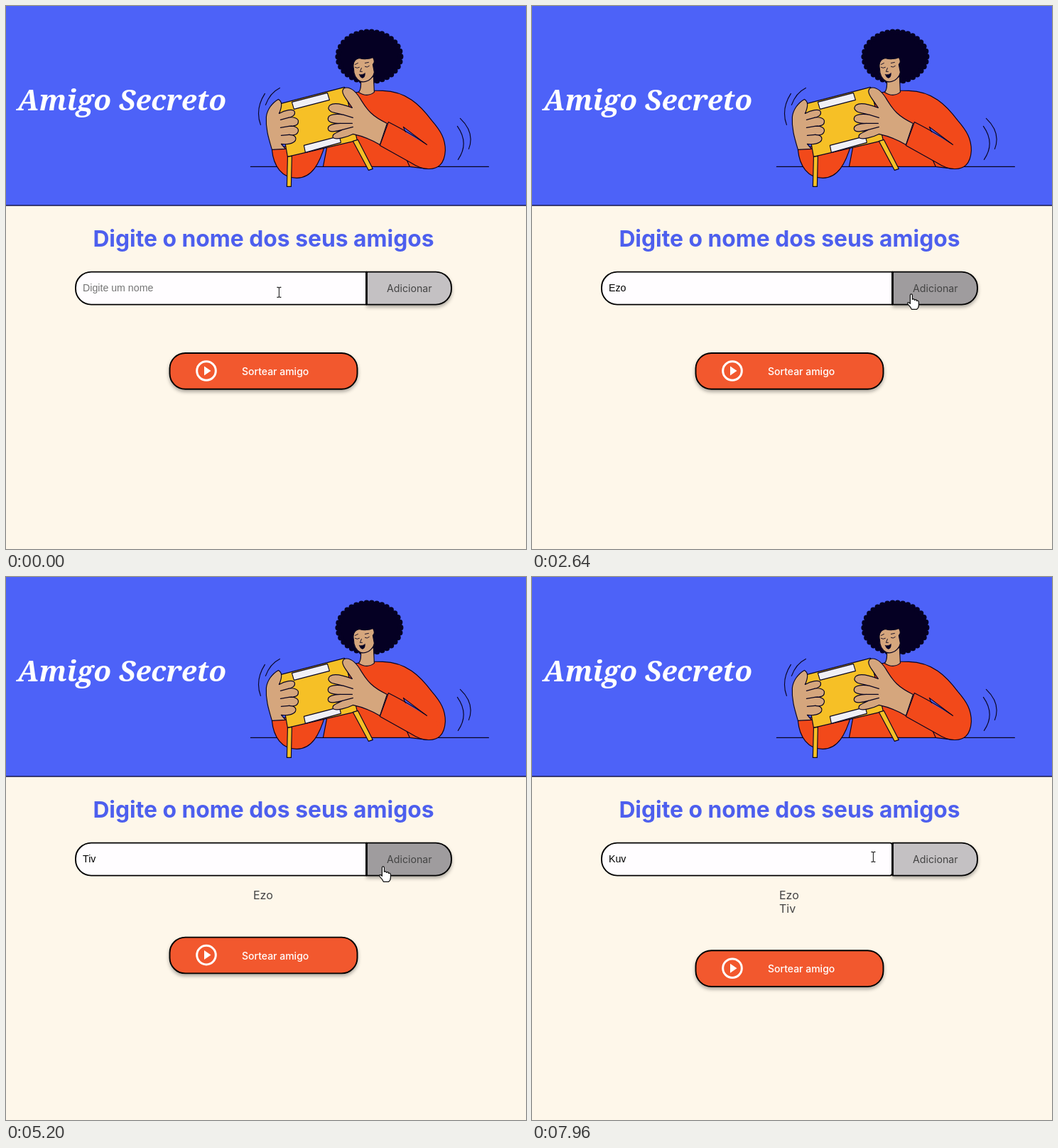
Recreate the animation shown at these times as an HTML page. Size 732 by 765 pixels, loop 8 s.

```html
<!DOCTYPE html>
<html lang="pt">
<head>
<meta charset="utf-8">
<title>Amigo Secreto</title>
<style>
  html, body { margin: 0; width: 100%; height: 100%; overflow: hidden; background: #fef7ea; }
  svg { display: block; width: 732px; height: 765px; }
  text { font: 14.2px Inter, sans-serif; }
  .title { font: italic 700 40.4px "Noto Serif", serif; fill: #fff; }
  .heading { font-size: 31.8px; font-weight: 700; fill: #4d5fee; text-anchor: middle; }
  .field { font-family: "Liberation Sans", Arial, sans-serif; }
  .friend { font-size: 16px; fill: #444; }
  .action { font-size: 14px; font-weight: 500; fill: #fff; }
  .box { stroke: #000; stroke-width: 1.9; }
  .shadow { filter: drop-shadow(.5px 3.5px 2.5px rgba(0, 0, 0, .32)); }
  .art { stroke: #080420; stroke-width: 1.15; stroke-linejoin: round; stroke-linecap: round; fill: none; }
  .art .shirt { fill: #f2491a; }
  .art .skin { fill: #d5a67d; }
  .art .gift { fill: #f6c026; }
  .art .label { fill: #f0f0f6; }
  .art .dark { fill: #050023; stroke: #050023; }
</style>
</head>
<body>
<svg viewBox="0 0 732 765">
  <rect width="732" height="765" fill="#fef7ea"/>
  <rect width="732" height="281" fill="#4d62f8"/>
  <path d="M0 281H732" stroke="#15164a" stroke-width="1.5"/>
  <text class="title" x="16" y="146.5">Amigo Secreto</text>

  <g class="art" transform="translate(.4 .4)">
    <path d="M344 226H679M364 123Q350 145 358 167M385 115Q371 122 365 139M639 158Q660 178 651 201M635 169Q652 193 636 216"/>

    <!-- Shirt -->
    <path class="shirt" d="M374 202C376 225 388 242 409 242C430 242 441 222 449 194L400 196Z"/>
    <path class="shirt" d="M446 226L452 195L490 122Q506 118 530 119C563 120 582 138 599 161C612 176 618 187 618 203C617 222 608 230 593 229L568 226Z"/>
    <path d="M559 170L592 195L563 180Z" fill="#4d62f8"/>
    <path d="M563 215L568 226"/>

    <!-- Head -->
    <ellipse class="dark" cx="511" cy="71" rx="44" ry="35"/>
    <ellipse class="dark" cx="511" cy="71" rx="44" ry="35" stroke-width="8" stroke-dasharray="0 7.3"/>
    <path class="skin" d="M499 104L517 99L518 121Q508 129 496 121Q500 117 499 104Z"/>
    <path class="skin" d="M489 88C487 78 492 74 497 73Q506 76 516 72Q520 78 516 82L518 93C516 103 506 108 499 106C491 102 489 96 489 88Z"/>
    <path stroke-width=".9" d="M491 86Q494 88 497 86M505 85Q508 87 511 84M491 82L495 80M505 80L510 79M500 87L498 92L501 92"/>
    <path class="dark" stroke-width=".6" d="M497 96Q502 97 505 94Q505 101 501 101Q498 100 497 96Z"/>

    <!-- Gift -->
    <path class="gift" d="M383 138L476 114L494 189L396 212Z"/>
    <path class="label" d="M402 135L452 122L455 132L405 145Z"/>
    <path class="label" d="M419 196L469 183L471 192L421 206Z"/>
    <path class="gift" d="M396 212L402 211L401 254H395Z"/>
    <path class="gift" d="M488 190L495 188L516 229L510 231Z"/>

    <!-- Hands and forearm -->
    <path class="skin" d="M374 202C369 185 365 172 366 156C367 146 374 136 383 131C389 134 388 142 384 151C391 147 405 143 406 149C407 154 402 156 397 157C404 155 412 158 411 163C411 168 404 169 398 169C406 168 412 171 411 176C410 181 404 182 398 181C405 181 409 184 407 189C404 194 394 195 387 194L393 201Z"/>
    <path d="M397 157L386 160M398 169L386 171M398 181L387 182"/>
    <path class="skin" d="M536 165C515 155 508 146 500 133C492 119 484 113 476 115C471 118 474 124 478 130L487 143C474 138 462 135 456 139C450 144 456 149 462 150L475 153C465 151 453 152 453 158C452 164 462 165 470 165C462 165 452 167 453 173C454 178 462 177 473 174C462 179 458 181 460 185C464 189 480 184 488 180Q507 184 526 195Z"/>
    <path d="M475 153L488 157M470 165L487 165M473 174L488 170"/>
    <path class="shirt" stroke="none" d="M538 163L592 195L610 205L593 229Q583 228 569 220L526 196Z"/>
    <path d="M592 195Q575 182 538 163L526 196L569 220Q583 229 593 229"/>
  </g>

  <text class="heading" x="362.5" y="339">Digite o nome dos seus amigos</text>

  <path id="add" class="box shadow" d="M508 374.6H605A22 22 0 0 1 627 396.6V398.6A22 22 0 0 1 605 420.6H508Z"/>
  <text x="536" y="403" fill="#444">Adicionar</text>
  <path id="input" class="box" fill="#fffdff"/>
  <text id="value" class="field" x="108" y="402"></text>
  <path id="caret" stroke="#000"/>

  <text class="friend" x="348" y="454">Ezo</text>
  <text class="friend" x="348" y="472.6">Tiv</text>

  <g id="draw">
    <rect class="box shadow" x="230.5" y="489" width="264" height="50.8" rx="22" fill="#f2582e"/>
    <circle cx="282" cy="514" r="13.3" fill="none" stroke="#fff" stroke-width="3"/>
    <path d="M279 507.5V520.5L288.5 514Z" fill="#fff"/>
    <text class="action" x="332" y="520">Sortear amigo</text>
  </g>

  <g id="pointer">
    <path id="beam" d="M-3 -7H-1L0 -6L1 -7H3M0 -6V6M-3 7H-1L0 6L1 7H3" fill="none" stroke="#222" stroke-width="1.1"/>
    <path id="hand" d="M-3 -9C-3 -11 0 -11 0 -9V-3Q2 -5 3 -2Q6 -4 6 -1Q9 -2 9 1V5Q9 9 6 11H-1Q-2 8 -6 4C-8 1 -5 0 -3 3Z" fill="#fff" stroke="#111" stroke-width="1.2" stroke-linejoin="round"/>
  </g>
</svg>
<script>
const LOOP = 8000;
const $ = id => document.getElementById(id);
const friends = document.querySelectorAll(".friend");

// [time, field text, focused]
const events = [
  [0, "", false], [240, "", true],
  [640, "E", true], [880, "Ez", true], [1120, "Ezo", true],
  [2580, "Ezo", false], [2660, "", false], [3250, "", true],
  [3900, "T", true], [4100, "Ti", true], [4300, "Tiv", true],
  [5180, "Tiv", false], [5260, "", false], [5800, "", true],
  [6800, "K", true], [7080, "Ku", true], [7300, "Kuv", true]
];
const addedAt = [2660, 5260];

// [time, x, y]
const pointerPath = [
  [0, 384, 403], [1950, 384, 403], [2400, 535, 416], [2850, 535, 416],
  [3230, 415, 395], [4500, 415, 395], [4950, 532, 418], [5380, 532, 418],
  [5780, 400, 400], [7600, 400, 400], [7960, 480, 394], [8000, 492, 395]
];

function pointerAt(t) {
  const i = pointerPath.findIndex(point => point[0] > t);
  const [t0, x0, y0] = pointerPath[i - 1], [t1, x1, y1] = pointerPath[i];
  const u = (t - t0) / (t1 - t0), ease = u * u * (3 - 2 * u);
  return [x0 + (x1 - x0) * ease, y0 + (y1 - y0) * ease];
}

function inputShape(r) {
  const top = 374.6, bottom = 420.6, right = 507;
  return `M120 ${top}H${right - r}Q${right} ${top} ${right} ${top + r}V${bottom - r}` +
    `Q${right} ${bottom} ${right - r} ${bottom}H120A22 22 0 0 1 98 ${bottom - 22}V${top + 22}A22 22 0 0 1 120 ${top}Z`;
}

function show(element, visible) {
  element.style.visibility = visible ? "visible" : "hidden";
}

function render(t) {
  const [since, text, focused] = events.findLast(event => event[0] <= t);
  const value = $("value");
  value.textContent = text || "Digite um nome";
  value.setAttribute("fill", text ? "#000" : "#757575");
  $("input").setAttribute("d", inputShape(focused ? 3 : 0));

  const caretX = 108.5 + (text ? value.getComputedTextLength() : 0);
  $("caret").setAttribute("d", `M${caretX} 389.5V405`);
  show($("caret"), focused && (t - since) % 1000 < 500);

  friends.forEach((friend, i) => show(friend, t >= addedAt[i]));
  const count = addedAt.filter(time => t >= time).length;
  $("draw").setAttribute("transform", `translate(0 ${count * 18.6})`);

  const [x, y] = pointerAt(t), hovering = x > 508;
  $("pointer").setAttribute("transform", `translate(${x + .4} ${y + .4})`);
  show($("beam"), !hovering);
  show($("hand"), hovering);
  $("add").setAttribute("fill", hovering ? "#9f9c9e" : "#c4c1c3");
}

const start = performance.now();
function frame() {
  render((performance.now() - start) % LOOP);
  requestAnimationFrame(frame);
}
frame();
</script>
</body>
</html>
```
